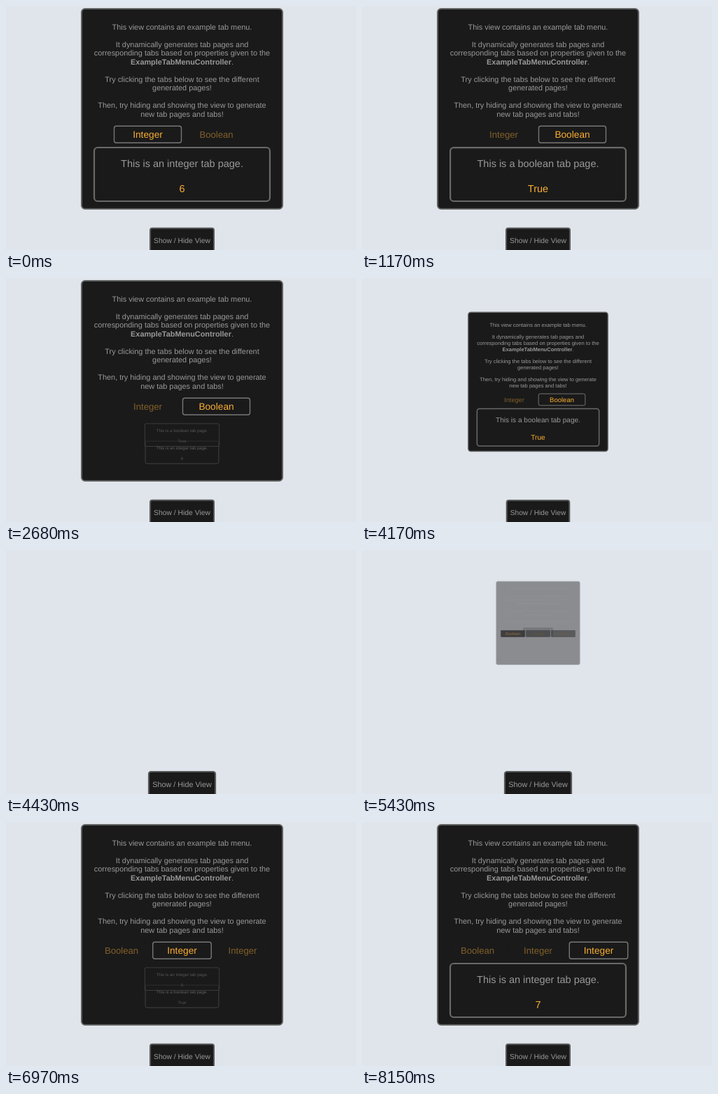
An HTML page that plays this animation: 500x350 px, repeating every 8550 ms.

```html
<!DOCTYPE html>
<html lang="en">
<head>
<meta charset="utf-8">
<title>Tab menu</title>
<style>
  html, body { margin: 0; width: 100%; height: 100%; overflow: hidden; background: #e0e4eb; }
  svg { display: block; width: 100%; height: 100%; }
  text { font-family: "Liberation Sans", Arial, sans-serif; text-anchor: middle; text-rendering: geometricPrecision; }
</style>
</head>
<body>
<svg id="stage" viewBox="0 0 500 350"></svg>
<script>
const LOOP = 8550, CX = 251.5;
const DARK = '#1a1a1a', GREY = '#999999';
const AMBER = [250, 174, 50], DIM = [130, 96, 42], ASH = [125, 125, 122];
const HIDE = 4010, SHOW = 5120, LAND = 5470;

const INTRO = [
  [30, 'This view contains an example tab menu.'],
  [55, 'It dynamically generates tab pages and'],
  [67.5, 'corresponding tabs based on properties given to the'],
  [80, '<tspan font-weight="bold">ExampleTabMenuController</tspan>.'],
  [105, 'Try clicking the tabs below to see the different'],
  [117.5, 'generated pages!'],
  [142.5, 'Then, try hiding and showing the view to generate'],
  [155, 'new tab pages and tabs!']
];

const integer = value => ({ tab: 'Integer', title: 'This is an integer tab page.', value });
const boolean = value => ({ tab: 'Boolean', title: 'This is a boolean tab page.', value });

// Each menu: its pages, tab geometry and the selections [time, index].
const MENUS = [
  { pages: [integer(6), boolean('True')], first: 202.5, step: 98, width: 96,
    picks: [[-2000, 0], [700, 1], [1540, 0], [2390, 1]] },
  { pages: [boolean('True'), integer(0), integer(7)], first: 165, step: 86.5, width: 83.5,
    picks: [[-2000, 0], [6680, 1], [7600, 2]] }
];

const clamp = x => Math.min(1, Math.max(0, x));
const smooth = x => { x = clamp(x); return x * x * (3 - 2 * x); };
const mix = (a, b, k) => `rgb(${a.map((v, i) => Math.round(v + (b[i] - v) * k))})`;

const label = (x, y, size, fill, alpha, str) =>
  `<text x="${x}" y="${y + size * 0.35}" font-size="${size}" fill="${fill}" opacity="${alpha}">${str}</text>`;

const box = (cx, cy, w, h, r, line, width, alpha) =>
  `<rect x="${cx - w / 2}" y="${cy - h / 2}" width="${w}" height="${h}" rx="${r}" fill="${DARK}" ` +
  `stroke="${line}" stroke-width="${width}" opacity="${alpha}"/>`;

const zoomed = (cy, { scale, dy }, content) =>
  `<g transform="translate(${CX} ${cy + dy}) scale(${scale}) translate(${-CX} ${-cy})">${content}</g>`;

// Drop in small from above, then grow; t is relative to the landing.
function zoomIn(t, grow) {
  if (t < 0) {
    const n = -t / 30;
    return { scale: 0.43 - 0.00825 * n * n, dy: 8 - 30 * n * n, alpha: n > 5 ? 0 : 0.55 - 0.09 * n };
  }
  const u = clamp(t / grow), e = 1 - (1 - u) ** 3;
  return { scale: 0.43 + 0.57 * e, dy: 8 * (1 - e), alpha: 0.55 + 0.45 * clamp(u * 2) };
}

// Shrink with a slight dip, then fly upward while fading.
function zoomOut(t) {
  const a = smooth((t - 30) / 250), u = clamp((t - 285) / 150);
  return { scale: 1 - 0.57 * a - 0.3 * u, dy: 9 * a ** 3 - 200 * u * u, alpha: 1 - clamp((t - 200) / 200) };
}

function drawPage(page, pose, viewAlpha) {
  const alpha = pose.alpha * viewAlpha;
  if (alpha <= 0) return '';
  const tint = mix(AMBER, ASH, clamp((0.8 - pose.scale) / 0.4));
  return zoomed(241.5, pose,
    box(CX, 241.5, 251, 77, 5, '#696969', 2.2, alpha) +
    label(CX, 226, 14.5, GREY, alpha, page.title) +
    label(CX, 262, 14.5, tint, alpha, page.value));
}

function drawTab(menu, i, lit, alpha) {
  const x = menu.first + i * menu.step;
  return box(x, 184.3, menu.width, 24, 3, 'none', 0, alpha) +
    box(x, 184.3, menu.width, 24, 3, '#777777', 1.4, alpha * lit) +
    label(x, 184.3, 13.15 + 0.55 * lit, mix(DIM, AMBER, lit), alpha, menu.pages[i].tab);
}

function drawView(menu, t, pose) {
  const { alpha } = pose;
  if (alpha <= 0) return '';
  const now = menu.picks.findLastIndex(p => p[0] <= t);
  const [start, active] = menu.picks[now];
  const before = now ? menu.picks[now - 1][1] : -1;
  const since = t - start, lit = smooth(since / 120);

  let out = box(CX, 147.5, 287, 287, 5, '#5e5f60', 2, alpha);
  out += INTRO.map(([y, str]) => label(CX, y, 10.9, GREY, alpha, str)).join('');
  if (before >= 0) out += drawPage(menu.pages[before], zoomOut(since), alpha);
  const entry = menu === MENUS[1] && !now ? zoomIn(t - LAND - 7, 500) : zoomIn(since - 318, 172);
  out += drawPage(menu.pages[active], entry, alpha);
  out += menu.pages.map((_, i) =>
    drawTab(menu, i, i === active ? lit : i === before ? 1 - lit : 0, alpha)).join('');
  return zoomed(147.5, pose, out);
}

// Hover enlarges the button, each press dips it.
function buttonScale(t) {
  const hover = smooth((t - 3360) / 120) - smooth((t - 6680) / 100);
  const press = s => smooth((t - s) / 100) - smooth((t - s - 100) / 150);
  return 1 + 0.045 * hover - 0.095 * (press(HIDE) + press(SHOW));
}

function draw(t) {
  let out = '<rect width="500" height="350" fill="#e0e4eb"/>';
  if (t < SHOW) out += drawView(MENUS[0], t, zoomOut(t - HIDE));
  else out += drawView(MENUS[1], t, zoomIn(t - LAND, 500));
  out += zoomed(336, { scale: buttonScale(t), dy: 0 },
    box(CX, 336, 91, 34.5, 3, '#565757', 2, 1) +
    label(CX, 336, 10.35, GREY, 1, 'Show / Hide View'));
  stage.innerHTML = out;
}

const stage = document.getElementById('stage');
const begin = performance.now();
function tick() {
  draw((performance.now() - begin) % LOOP);
  requestAnimationFrame(tick);
}
tick();
</script>
</body>
</html>
```
